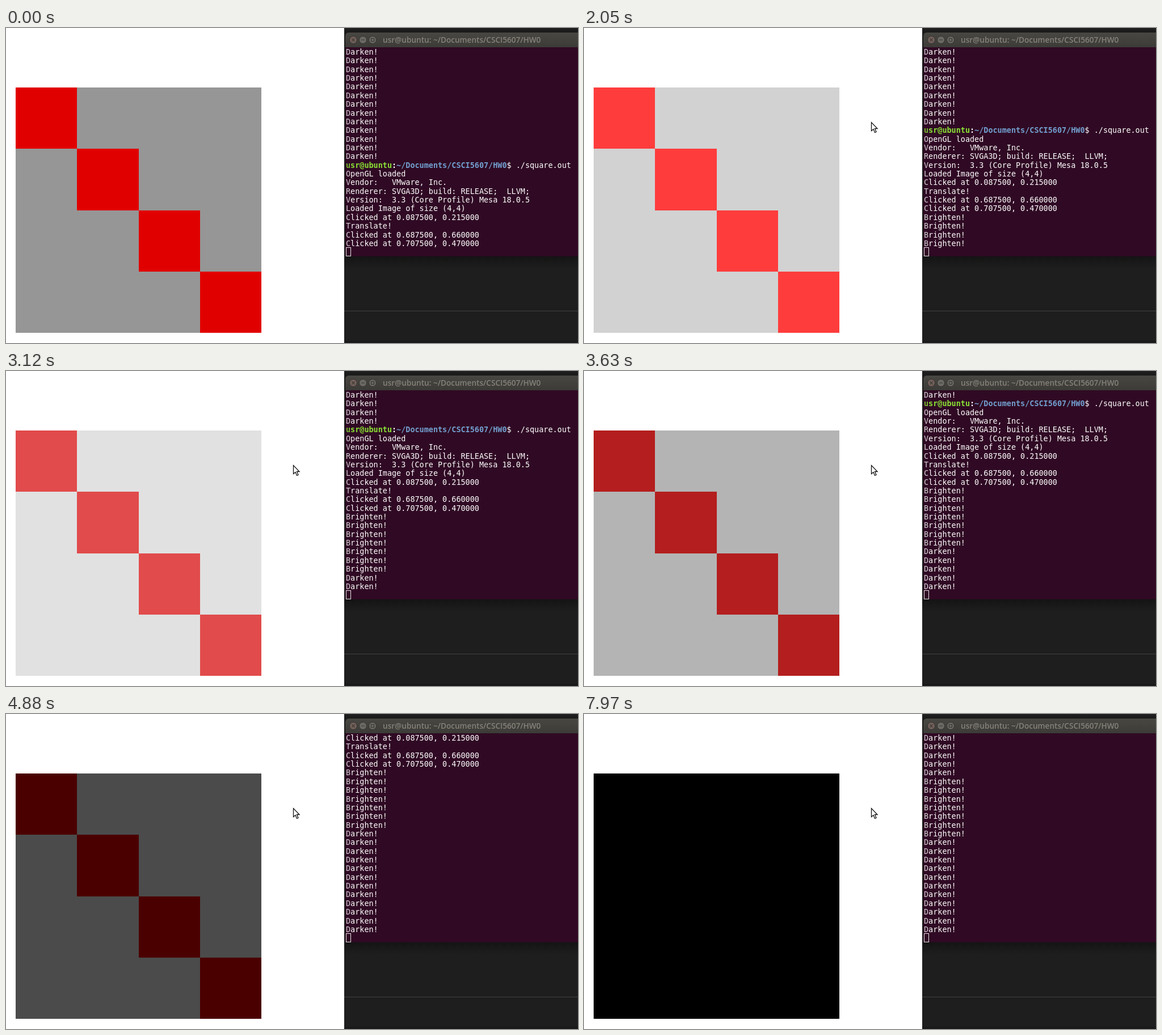
Write an HTML page with a canvas that moves like this. It is 1008 by 556 pixels and loops after 8000 ms.

```html
<!DOCTYPE html>
<html lang="en">
<head>
<meta charset="utf-8">
<title>Brighten and darken</title>
<style>
html, body { margin: 0; width: 100%; height: 100%; overflow: hidden; background: #fff; }
canvas { display: block; }
</style>
</head>
<body>
<canvas width="1008" height="556"></canvas>
<script>
const ctx = document.querySelector('canvas').getContext('2d');
const LOOP = 8000, ROWS = 23, ROW_H = 15.36, CHAR_W = 8.1, LEFT = 599;
const MONO = '13.46px "DejaVu Sans Mono", monospace';
const USER = 'usr@ubuntu', FOLDER = '~/Documents/CSCI5607/HW0';

const history = [
  ...Array(13).fill('Darken!'),
  'PROMPT',
  'OpenGL loaded',
  'Vendor:   VMware, Inc.',
  'Renderer: SVGA3D; build: RELEASE;  LLVM;',
  'Version:  3.3 (Core Profile) Mesa 18.0.5',
  'Loaded Image of size (4,4)',
  'Clicked at 0.087500, 0.215000',
  'Translate!',
  'Clicked at 0.687500, 0.660000',
  'Clicked at 0.707500, 0.470000',
];

// Evenly spaced key presses: first time, last time, count, brightness change.
const presses = [
  [1590, 2050, 4, 15], [2250, 2610, 3, 15],
  [2940, 3630, 5, -15], [3810, 4880, 7, -15], [5010, 5010, 1, -15],
  [5240, 6130, 6, 15], [6310, 6310, 1, 15],
  [6490, 7230, 6, -15], [7410, 7970, 5, -15],
].flatMap(([first, last, count, change]) =>
  Array.from({ length: count }, (_, i) => ({
    time: first + (last - first) * i / Math.max(1, count - 1),
    change,
  })));

function rect(x, y, w, h, fill) {
  ctx.fillStyle = fill;
  ctx.fillRect(x, y, w, h);
}

function text(string, x, y, fill, font) {
  ctx.font = font;
  ctx.fillStyle = fill;
  ctx.fillText(string, x, y);
}

function vertical(y0, y1, ...colors) {
  const gradient = ctx.createLinearGradient(0, y0, 0, y1);
  colors.forEach((color, i) => gradient.addColorStop(i / (colors.length - 1), color));
  return gradient;
}

function drawImage(pressed) {
  const clamp = v => Math.max(0, Math.min(255, v));
  let gray = 150, red = [225, 0, 0];
  for (const { change } of pressed) {
    gray = clamp(gray + change);
    red = red.map(v => clamp(v + change));
  }
  rect(0, 0, 596, 556, '#fff');
  rect(17, 105, 433, 433, `rgb(${gray},${gray},${gray})`);
  for (let i = 0; i < 4; i++) {
    const a = Math.round(i * 108.25), b = Math.round((i + 1) * 108.25);
    rect(17 + a, 105 + a, b - a, b - a, `rgb(${red})`);
  }
}

function drawButton(x, fill) {
  ctx.beginPath();
  ctx.arc(x, 21, 6.5, 0, 7);
  ctx.fillStyle = fill;
  ctx.fill();
  ctx.strokeStyle = '#33322e';
  ctx.lineWidth = 1;
  ctx.stroke();
}

function drawWindow() {
  rect(596, 0, 412, 556, '#1e1e1e');
  rect(596, 0, 412, 8, vertical(0, 8, '#202020', '#191919'));
  rect(596, 8, 2, 396, '#191919');
  rect(596, 403, 412, 22, vertical(403, 425, '#141414', '#1e1e1e'));
  rect(596, 499, 412, 1, '#414141');
  rect(596, 552, 412, 4, '#191919');

  ctx.beginPath();
  ctx.roundRect(598, 8, 420, 26, [6, 0, 0, 0]);
  ctx.fillStyle = vertical(8, 34, '#484742', '#3c3b37');
  ctx.fill();
  rect(598, 34, 410, 369, '#300a24');

  drawButton(612, '#73605b');
  drawButton(629, '#6b6963');
  drawButton(646, '#6b6963');
  ctx.strokeStyle = '#3a3934';
  ctx.lineWidth = 1.2;
  ctx.beginPath();
  ctx.moveTo(609.5, 18.5); ctx.lineTo(614.5, 23.5);
  ctx.moveTo(614.5, 18.5); ctx.lineTo(609.5, 23.5);
  ctx.moveTo(626, 21); ctx.lineTo(632, 21);
  ctx.stroke();
  ctx.strokeRect(643.5, 18.5, 5, 5);
  text(`${USER}: ${FOLDER}`, 664, 26, '#85827a', '600 13.6px "Open Sans", sans-serif');
}

function drawPrompt(y) {
  let column = 0;
  const part = (string, fill, weight) => {
    text(string, LEFT + column * CHAR_W, y, fill, `${weight} ${MONO}`);
    column += string.length;
  };
  part(USER, '#8ae234', 'bold');
  part(':', '#fff', 'bold');
  part(FOLDER, '#729fcf', 'bold');
  part('$ ./square.out', '#fff', 'normal');
}

function drawLog(pressed) {
  const lines = [...history, ...pressed.map(p => p.change > 0 ? 'Brighten!' : 'Darken!')];
  lines.slice(-ROWS).forEach((line, row) => {
    const y = 47 + row * ROW_H;
    if (line === 'PROMPT') drawPrompt(y);
    else text(line, LEFT, y, '#fff', MONO);
  });
  // The window edge slightly dims the first column.
  rect(598, 34, 9, 352, 'rgba(48,10,36,.2)');
  ctx.strokeStyle = '#e8e4e6';
  ctx.lineWidth = 1;
  ctx.strokeRect(599.5, 387.5, 8, 15);
}

function drawPointer(time) {
  if (time < 30) return;
  const tick = 820 / 15;
  const t = 30 + Math.floor((Math.min(time, 850) - 30 + .01) / tick) * tick;
  const smooth = p => p * p * (3 - 2 * p);
  const sweep = smooth(Math.min(1, (t - 30) / 650));
  const settle = smooth(Math.max(0, Math.min(1, (t - 680) / 165)));
  ctx.save();
  ctx.translate(796 - 298 * sweep + 8.5 * settle, 455 - 292 * sweep + 3.5 * settle);
  ctx.beginPath();
  ctx.moveTo(0, 0);
  for (const [x, y] of [[0, 15], [3.5, 12], [6, 18], [8.5, 17], [6, 11], [10.5, 11]]) ctx.lineTo(x, y);
  ctx.closePath();
  ctx.fillStyle = '#fff';
  ctx.fill();
  ctx.strokeStyle = '#111';
  ctx.lineWidth = 1.3;
  ctx.stroke();
  ctx.restore();
}

function draw() {
  const time = performance.now() % LOOP;
  const pressed = presses.filter(p => p.time <= time);
  drawImage(pressed);
  drawWindow();
  drawLog(pressed);
  drawPointer(time);
  requestAnimationFrame(draw);
}
draw();
</script>
</body>
</html>
```
